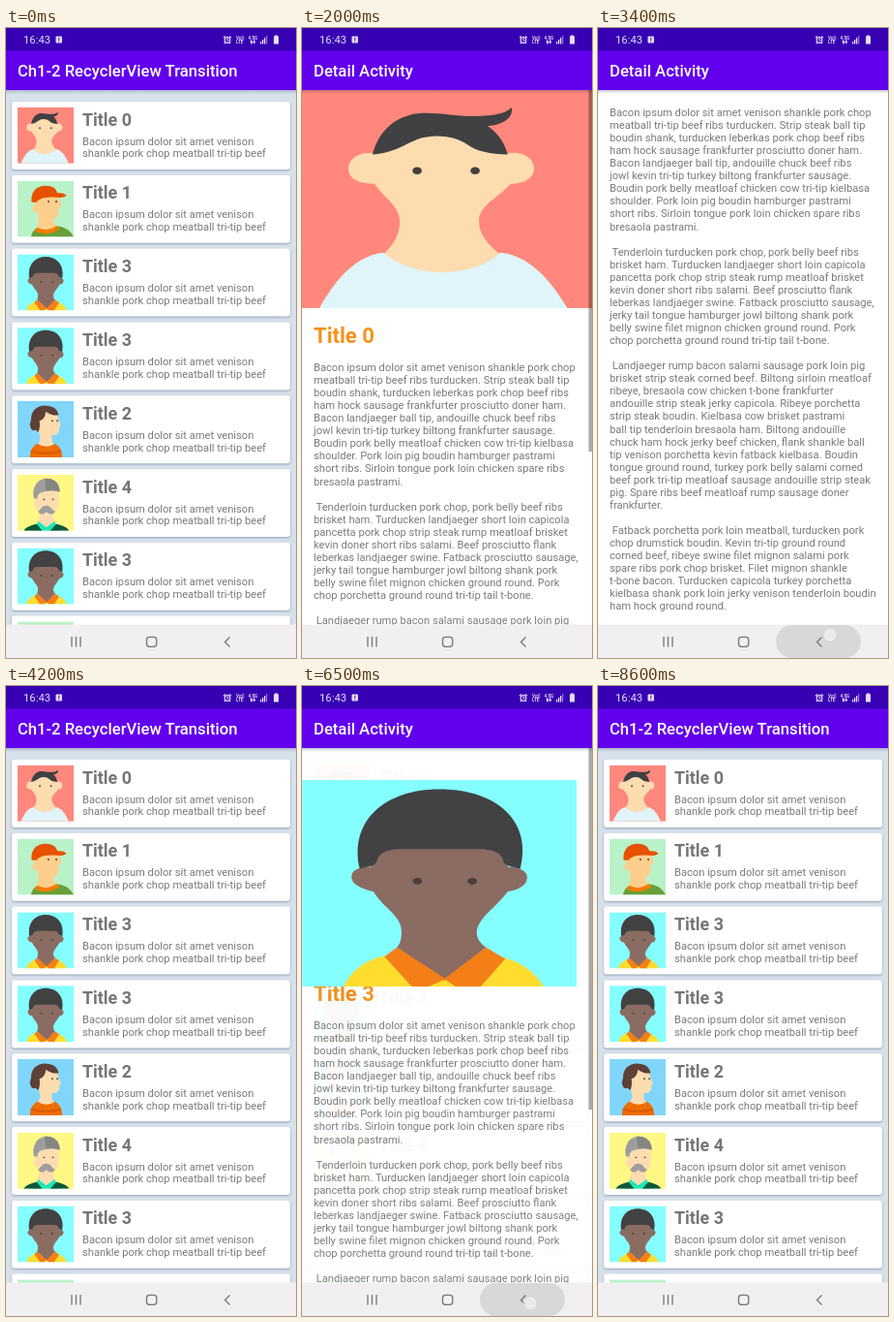
These frames come from a looping animation (300 px wide and 650 px high, 8.7 s). An HTML page:

```html
<!DOCTYPE html>
<html lang="en">
<head>
<meta charset="utf-8">
<title>List to detail transition</title>
<style>
  html, body { margin: 0; width: 100%; height: 100%; overflow: hidden; background: #fff; }
  svg { display: block; }
  #stage { position: absolute; left: 0; top: 0; }
  text { font-family: Roboto, "Open Sans", sans-serif; white-space: pre; }
  .card { fill: #fff; filter: drop-shadow(0 1px 1.3px rgba(50, 70, 100, .42)); }
  .body { font-size: 11.17px; fill: #7a7a7a; }
  .name { font-size: 17.9px; font-weight: 700; fill: #757575; }
  .head { font-size: 22.1px; font-weight: 700; fill: #f5921a; }
  .bar { font-size: 16.67px; font-weight: 500; fill: #fff; }
  .tiny { font-size: 4.6px; font-weight: 700; fill: #e4dcf6; }
</style>
</head>
<body>
<svg id="stage" width="300" height="650" viewBox="0 0 300 650">
  <defs>
    <linearGradient id="fall" x2="0" y2="1">
      <stop stop-color="#203050" stop-opacity=".25"/>
      <stop offset="1" stop-color="#203050" stop-opacity="0"/>
    </linearGradient>

    <symbol id="a0" viewBox="0 0 100 100" preserveAspectRatio="none">
      <rect width="100" height="100" fill="#ff877b"/>
      <path fill="#fddcb0" d="M25 29C19 28 16 32 16 36C16 41 20 43 25 43C28 49 33.5 53 33.7 60C33.8 67 31 72 27.5 76L30 92L66 92L69 76C64 71 61 66 61 60C61 53 68 49 72 43C77 43 80 40 80 36C80 31 76 28 71 29C66 18 58 14 48 14C38 14 29 19 25 29Z"/>
      <path fill="#dff5f9" d="M6 100C11 88 18 76 28 74.500C33 80 40 83.500 48 83.500C57 83.500 64 80 68.500 74.500C79 76 86 88 91.500 100Z"/>
      <path fill="#414042" d="M24.300 29.500C26 21 30 14 37 11.500C44 9 53 12.500 60 12C66 11.800 70 11 72.300 8C73 13 69 16 64 16.500C68 20 70 25 71 29.500C65 29.500 60 28 57 25C53 21.500 48 20.500 43 21.500C37 22.500 34 28.500 24.300 29.500Z"/>
      <ellipse cx="39.700" cy="37" rx="1.600" ry="1.700" fill="#45403c"/>
      <ellipse cx="59.700" cy="37" rx="1.600" ry="1.700" fill="#45403c"/>
    </symbol>

    <symbol id="a1" viewBox="0 0 100 100" preserveAspectRatio="none">
      <rect width="100" height="100" fill="#b9f2c8"/>
      <path fill="#fdcf8c" d="M31 28L75 28C74 36 80 42 77 46L72 48C74 60 72 66 64 67C64 74 67 79 72 83L50 93L32 86C38 78 38 68 35 56C27 57 24 49 28 44C31 42 32 36 31 28Z"/>
      <path fill="#689f38" d="M24 100C26 90 31 86 35 84C46 89 60 89 70 81C84 82 94 88 100 100Z"/>
      <path fill="#f57c00" d="M30 89L35 83C46 89 60 88 69 80L75 85C62 96 44 97 30 89Z"/>
      <path fill="#e65100" d="M25 38C23 20 33 9 50 9C62 9 69 14 71 22C77 21 84 22 87 26C83 31 74 30 64 29C50 29 38 31 34 38Z"/>
      <circle cx="55" cy="37" r="1.700" fill="#4e3c30"/>
      <circle cx="69" cy="37" r="1.700" fill="#4e3c30"/>
    </symbol>

    <symbol id="a2" viewBox="0 0 100 100" preserveAspectRatio="none">
      <rect width="100" height="100" fill="#81d6fb"/>
      <ellipse cx="29" cy="42" rx="7" ry="10" fill="#5d4037"/>
      <path fill="#fddcb0" d="M35 20L71 20C72 30 74 36 77 42C78 45 74 46 74 48C75 58 70 61 61 60C60 68 62 75 67 80L50 88L34 80C41 73 42 62 36 52Z"/>
      <path fill="#5d4037" d="M24 33C24 16 36 7 51 8C63 8 72 14 73 25C64 26 56 23 50 18C50 27 46 33 39 35C40 42 40 49 37 55C31 50 23 44 24 33Z"/>
      <circle cx="62" cy="35" r="1.600" fill="#4e3c30"/>
      <circle cx="71" cy="35" r="1.600" fill="#4e3c30"/>
      <path fill="#ef6c00" d="M22 100C23 87 28 78 36 76C46 82 57 82 66 76C75 79 79 88 80 100Z"/>
      <path fill="#d95a00" d="M24 87C40 92 62 92 77 87L78 91C62 96 40 96 23 91Z"/>
    </symbol>

    <symbol id="a3" viewBox="0 0 100 100" preserveAspectRatio="none">
      <rect width="100" height="100" fill="#84feff"/>
      <path fill="#ffdd2f" d="M15 100C18 92 23 87 30 85L52 94L73.500 86C80 88 85 93 88 100Z"/>
      <path fill="#8b6c63" d="M25 42C20 42 18 44 18 47C18 51 23 53 26 54C29 61 35 65 36 71C36.500 75 36 79 34.500 81L52 97L67 81C64 78 63 75 64 71C66 65 71 61 75 54C79 53 82 51 82 47C82 44 79 42 75 42L72 26L28 26Z"/>
      <path fill="#f57f17" d="M34.500 81L52 96L67 81L74 86.500L65 100L56 100L52 96.500L46 100L40 100L30 85.500Z"/>
      <path fill="#424242" d="M21 43C17 20 30 4.500 50 4.500C71 4.500 84 20 79.500 43C77 42 75 42 73.500 40C73 35 69 33.500 64 33.500L36 33.500C31 33.500 28 35 27 40C26 42 23 42 21 43Z"/>
      <ellipse cx="42" cy="49" rx="1.700" ry="1.600" fill="#4a3e3b"/>
      <ellipse cx="62" cy="49" rx="1.700" ry="1.600" fill="#4a3e3b"/>
    </symbol>

    <symbol id="a4" viewBox="0 0 100 100" preserveAspectRatio="none">
      <rect width="100" height="100" fill="#fff884"/>
      <path fill="#fddcb0" d="M33 28L72 28C72 37 76 44 73 48C73 60 69 66 64 70C63 76 65 82 69 86L51 96L33 86C39 80 40 72 38 62C30 62 27 54 31 48Z"/>
      <path fill="#1de9b6" d="M28 100L37 83L51 94L66 83L74 100Z"/>
      <path fill="#0b5a3a" d="M11 100C15 93 25 90 34 88L44 100ZM92 100C88 93 78 90 69 88L58 100Z"/>
      <path fill="#9e9e9e" d="M29 42C25 22 36 7 52 7C66 7 76 17 75 31C65 27 53 28 42 32C36 34 36 39 35 43Z"/>
      <path fill="#858585" d="M48 7C66 6 76 17 75 31C66 28 58 28 51 29Z"/>
      <circle cx="47" cy="44" r="1.600" fill="#4e4a45"/>
      <circle cx="63" cy="44" r="1.600" fill="#4e4a45"/>
      <path fill="#9e9e9e" d="M36 65C41 64 42 55 51 55C60 55 61 64 67 65C64 73 55 71 51 66C48 71 40 73 36 65Z"/>
    </symbol>
  </defs>

  <rect width="300" height="650" fill="#d7e1eb"/>
  <g id="list"></g>
  <g id="detail">
    <rect y="64" width="300" height="552" fill="#fff"/>
    <g id="copy"><text id="head" class="head" x="12" y="324.700"></text></g>
  </g>
  <use id="hero"/>
  <rect id="thumb" x="296.500" width="3.500" height="373" fill="#000" fill-opacity=".33"/>

  <rect y="64" width="300" height="4" fill="url(#fall)"/>
  <rect width="300" height="64" fill="#6200ee"/>
  <rect width="300" height="23.500" fill="#3700b3"/>
  <text id="barList" class="bar" x="12" y="50">Ch1-2 RecyclerView Transition</text>
  <text id="barDetail" class="bar" x="12" y="50">Detail Activity</text>

  <g fill="#e4dcf6">
    <text x="18" y="16.300" font-size="11.300">16:43</text>
    <rect x="51.500" y="8.500" width="6.500" height="7" rx="1"/>
    <path d="M54.750 9.800V12.700M54.750 13.400V14.400" stroke="#3700b3"/>
    <g fill="none" stroke="#e4dcf6" stroke-width="1.100">
      <circle cx="229" cy="12.500" r="2.900"/>
      <path d="M229 10.800V12.700H230.500M225 10L227 8.300M233 10L231 8.300M226.800 15L225.800 16.200M231.200 15L232.200 16.200"/>
    </g>
    <text class="tiny" x="238" y="11.500">Vo))</text>
    <text class="tiny" x="238" y="16.300">LTE</text>
    <text class="tiny" x="250.500" y="11.500">4.5G</text>
    <path d="M253 16.300V14H252L254 12.300L255 14V16.300ZM256 12.500H257.500V14.500H258.500L256.800 16.300L255.500 14.500Z"/>
    <path d="M263 14h1.300v2.500h-1.300zM265 12h1.300v4.500h-1.300zM267 10h1.300v6.500h-1.300z"/>
    <path d="M269 8h1.300v8.500h-1.300z" opacity=".5"/>
    <path d="M278 7.500H281V8.500H282V16.500H277V8.500H278Z"/>
  </g>

  <rect y="615.500" width="300" height="34.500" fill="#f1eff1"/>
  <rect id="press" x="184" y="616" width="88" height="34" rx="17" fill="#d9d7d9"/>
  <g fill="none" stroke="#757575" stroke-width="1.300">
    <path d="M68 628V638.500M72.500 628V638.500M77 628V638.500"/>
    <rect x="145.500" y="628.300" width="10.300" height="10" rx="3"/>
    <path d="M231.500 628.500L226.500 633.500L231.500 638.500"/>
  </g>
  <circle id="dot" r="7" fill="#f0f0f0" fill-opacity=".75" stroke="#c8c8c8" stroke-opacity=".6" stroke-width=".7"/>
</svg>

<script>
const LOOP = 8700, MOVE = 450, MAX = 263;
const KINDS = [0, 1, 3, 3, 2, 4, 3, 1];
// lag: how far the right edge trails the rest on its way out
const VISITS = [
  { row: 0, tap: 800, open: 1042, scroll: [2330, 3150], press: 3180, back: 3425, dot: [240, 626], lag: .48 },
  { row: 6, tap: 4880, open: 5142, press: 6220, back: 6432, dot: [236, 637], lag: 0 }
];
const COPY = `Bacon ipsum dolor sit amet venison shankle pork chop
meatball tri-tip beef ribs turducken. Strip steak ball tip
boudin shank, turducken leberkas pork chop beef ribs
ham hock sausage frankfurter prosciutto doner ham.
Bacon landjaeger ball tip, andouille chuck beef ribs
jowl kevin tri-tip turkey biltong frankfurter sausage.
Boudin pork belly meatloaf chicken cow tri-tip kielbasa
shoulder. Pork loin pig boudin hamburger pastrami
short ribs. Sirloin tongue pork loin chicken spare ribs
bresaola pastrami.

 Tenderloin turducken pork chop, pork belly beef ribs
brisket ham. Turducken landjaeger short loin capicola
pancetta pork chop strip steak rump meatloaf brisket
kevin doner short ribs salami. Beef prosciutto flank
leberkas landjaeger swine. Fatback prosciutto sausage,
jerky tail tongue hamburger jowl biltong shank pork
belly swine filet mignon chicken ground round. Pork
chop porchetta ground round tri-tip tail t-bone.

 Landjaeger rump bacon salami sausage pork loin pig
brisket strip steak corned beef. Biltong sirloin meatloaf
ribeye, bresaola cow chicken t-bone frankfurter
andouille strip steak jerky capicola. Ribeye porchetta
strip steak boudin. Kielbasa cow brisket pastrami
ball tip tenderloin bresaola ham. Biltong andouille
chuck ham hock jerky beef chicken, flank shankle ball
tip venison porchetta kevin fatback kielbasa. Boudin
tongue ground round, turkey pork belly salami corned
beef pork tri-tip meatloaf sausage andouille strip steak
pig. Spare ribs beef meatloaf rump sausage doner
frankfurter.

 Fatback porchetta pork loin meatball, turducken pork
chop drumstick boudin. Kevin tri-tip ground round
corned beef, ribeye swine filet mignon salami pork
spare ribs pork chop brisket. Filet mignon shankle
t-bone bacon. Turducken capicola turkey porchetta
kielbasa shank pork loin jerky venison tenderloin boudin
ham hock ground round.`.split("\n");

const $ = id => document.getElementById(id);
const set = (node, attrs) => {
  for (const k in attrs) node.setAttribute(k, attrs[k]);
  return node;
};
const add = (parent, tag, attrs, text = "") => {
  const node = set(document.createElementNS("http://www.w3.org/2000/svg", tag), attrs);
  node.textContent = text;
  return parent.appendChild(node);
};
const clamp = v => Math.max(0, Math.min(1, v));
const ramp = (t, from, to) => clamp((t - from) / (to - from));
const mix = (a, b, p) => a + (b - a) * p;

function bezier(x1, y1, x2, y2) {
  const at = (a, b, s) => 3 * (1 - s) * (1 - s) * s * a + 3 * (1 - s) * s * s * b + s * s * s;
  return x => {
    let lo = 0, hi = 1;
    for (let i = 0; i < 24; i++) {
      const mid = (lo + hi) / 2;
      if (at(x1, x2, mid) < x) lo = mid; else hi = mid;
    }
    return x <= 0 ? 0 : x >= 1 ? 1 : at(y1, y2, lo);
  };
}
const ease = bezier(.4, 0, .2, 1);
const fling = bezier(.3, .15, .35, 1);

const rowY = i => 76 + i * 75.8;
const rows = KINDS.map((kind, i) => {
  const g = add($("list"), "g", { transform: `translate(0 ${rowY(i)})` });
  add(g, "rect", { class: "card", x: 6, width: 288, height: 70, rx: 3 });
  const tint = add(g, "rect", { x: 6, width: 288, height: 70, rx: 3, opacity: 0 });
  const pic = add(g, "use", { href: "#a" + kind, x: 12, y: 5.8, width: 58, height: 58 });
  add(g, "text", { class: "name", x: 79, y: 24.6 }, "Title " + kind);
  add(g, "text", { class: "body", x: 79, y: 44.5 }, "Bacon ipsum dolor sit amet venison");
  add(g, "text", { class: "body", x: 79, y: 57.4 }, "shankle pork chop meatball tri-tip beef");
  return { tint, pic };
});
COPY.forEach((line, i) => add($("copy"), "text", { class: "body", x: 12, y: 354 + i * 13.06 }, line));

function draw(t) {
  const v = t < 4700 ? VISITS[0] : VISITS[1];
  const closing = t >= v.back;
  const p = closing ? 1 - ease((t - v.back) / MOVE) : ease((t - v.open) / MOVE);
  const scroll = v.scroll ? MAX * fling(ramp(t, ...v.scroll)) : 0;
  const kind = KINDS[v.row];
  const shown = p > 0;

  rows.forEach((r, i) => {
    const mine = i === v.row;
    const tint = mine ? .1 * ramp(t, v.tap, v.tap + 150) * (1 - ramp(t, v.open + 200, v.open + 400)) : 0;
    set(r.tint, { opacity: tint });
    set(r.pic, { visibility: mine && shown ? "hidden" : "visible" });
  });

  set($("detail"), { opacity: closing ? Math.sqrt(p) : p });
  set($("copy"), { opacity: closing ? 1 : ramp(p, .6, 1), transform: `translate(0 ${-scroll})` });
  $("head").textContent = "Title " + kind;

  const left = 12 * (1 - p) ** 1.6;
  const right = mix(70, 300, p - v.lag * p * (1 - p));
  set($("hero"), {
    href: "#a" + kind,
    visibility: shown ? "visible" : "hidden",
    x: left,
    y: mix(rowY(v.row) + 5.8, 64 - scroll, p),
    width: right - left,
    height: mix(58, 225, p)
  });

  const faded = v.scroll ? 1 - ramp(t, v.scroll[1] + 50, v.scroll[1] + 220) : 1;
  set($("thumb"), { y: 64 + scroll * 178 / MAX, opacity: clamp(p * 2.5) * faded });

  const inDetail = t >= v.open && t < v.back + 120;
  set($("barList"), { opacity: inDetail ? 0 : 1 });
  set($("barDetail"), { opacity: inDetail ? 1 : 0 });

  const press = ramp(t, v.press, v.press + 150) * (1 - ramp(t, v.back + 90, v.back + 240));
  set($("press"), { opacity: press });
  set($("dot"), { cx: v.dot[0], cy: v.dot[1], opacity: press });
}

const start = performance.now();
function tick() {
  draw((performance.now() - start) % LOOP);
  requestAnimationFrame(tick);
}
tick();
</script>
</body>
</html>
```
